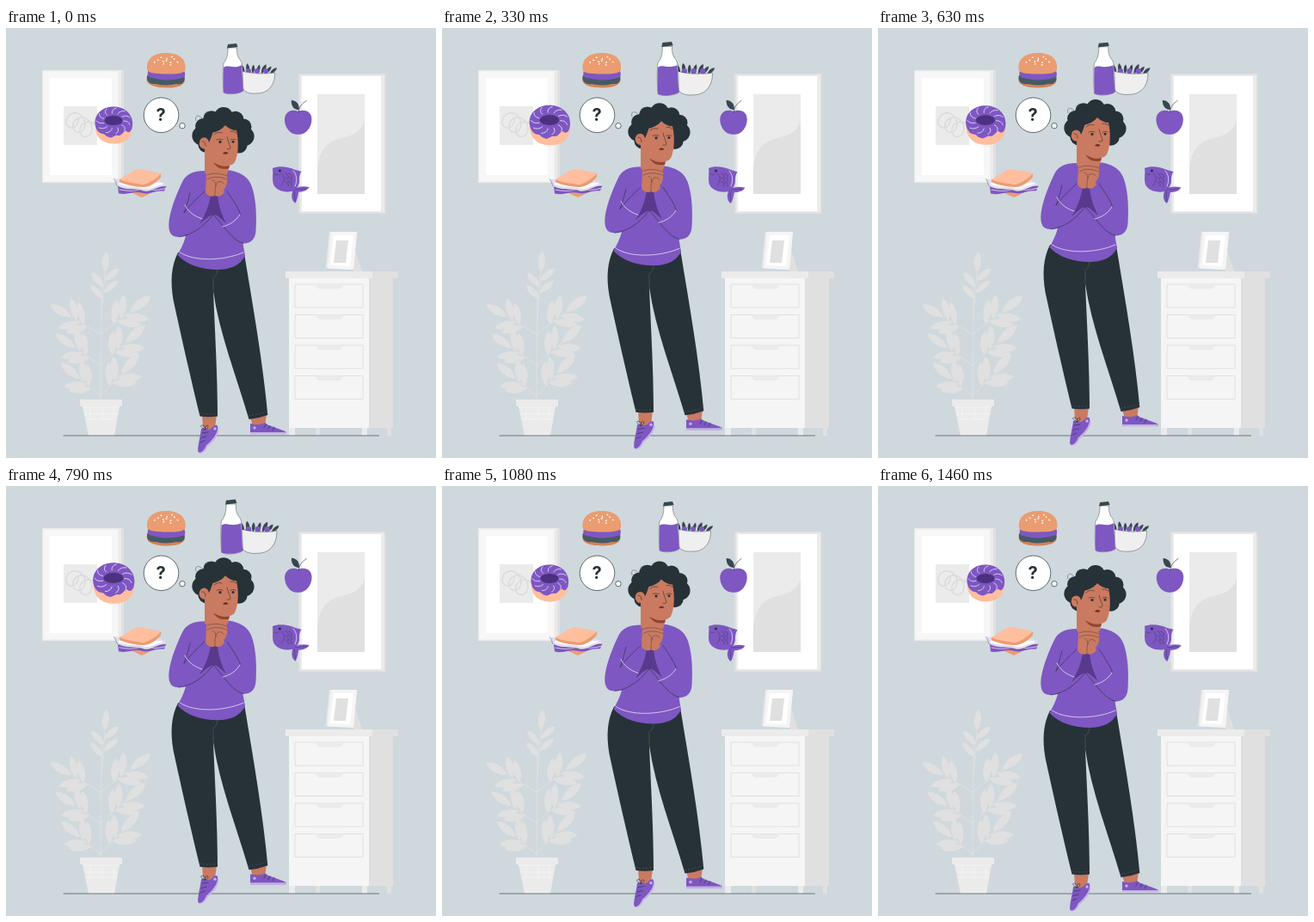
Write an HTML page that moves like this. It is 500x500 px and loops after 1.5 s.

```html
<!DOCTYPE html>
<html lang="en">
<head>
<meta charset="utf-8">
<title>What to eat</title>
<style>
html,body{margin:0;width:100%;height:100%;overflow:hidden;background:#cfd8dd}
svg{display:block;width:100vw;height:100vh}
.p{fill:#7e57c2}.d{fill:#263238}.s{fill:#ca7a60}.w{fill:#fff}
.a{fill:#f5f5f5}.b{fill:#ebebeb}.c{fill:#e0e0e0}.o{fill:#eb9c70}
.l{fill:none;stroke:#263238;stroke-width:.6;stroke-linecap:round;stroke-linejoin:round}
.t{stroke-width:.4}
.h{fill:none;stroke:#e9e0f7;stroke-width:.8;stroke-linecap:round}
.g{fill:none;stroke:#e0e0e0;stroke-width:1}
.k{fill:none;stroke:#52616a;stroke-width:.6}
</style>
</head>
<body>
<svg viewBox="0 0 500 500">
<!-- wall pictures -->
<g>
  <path class="c" d="M131 49h6v131h-6z"/>
  <path class="b" d="M42 49h92v131H42z"/>
  <path fill="#f7f7f7" d="M43.500 50.500h87v128h-87z"/>
  <path class="w" d="M51 58h72v113H51z"/>
  <path class="b" d="M67 91h39v45H67z"/>
  <path fill="none" stroke="#dcdcdc" stroke-width="1.600" id="scribble"/>
  <path class="c" d="M340 53h101.500v163H340z"/>
  <path class="b" d="M342 54.500h98v160h-98z"/>
  <path class="w" d="M344 56h92v157h-92z"/>
  <path class="b" d="M362 77h55v116h-55z"/>
  <path class="c" d="M362 172C362 150 368 136 383 130C395 126 411 126 417 108V193H362Z"/>
</g>
<!-- drawers -->
<g>
  <path class="c" d="M422 291h28v174h-28zM426 283h30v8h-30zM360 465h5v9h-5zM443 465h5v9h-5z"/>
  <path class="b" d="M325 283h101v8H325zM329 465h7v9h-7zM414 465h6v9h-6z"/>
  <path class="a" d="M329 291h93v174h-93z"/>
  <g id="drawers"></g>
  <path class="c" d="M404 252L414 283H404Z"/>
  <path class="b" d="M376 237H408L404 281L372 279Z"/>
  <path class="a" d="M378 237H408L404 281L374 279.500Z"/>
  <path class="w" d="M381 241H404L400 277L377 276Z"/>
  <path class="c" d="M384 247H398L395 273H381Z"/>
</g>
<!-- plant -->
<g id="plant" class="c"></g>
<path class="b" d="M86 432h49v8H86zM89 440h43L126 474H96Z"/>
<path fill="none" stroke="#f5f5f5" stroke-width=".8" d="M89 441H132M91 449H130M93 455H129M98 441V455M112 441V455M125 441V455"/>
<path class="l" d="M67 474H433.500"/>

<!-- thought bubble -->
<circle class="w" cx="180.500" cy="101.300" r="20.300" stroke="#263238" stroke-width=".7"/>
<circle class="w" cx="205" cy="113.700" r="3.200" stroke="#263238" stroke-width=".7"/>
<text x="180" y="108.400" text-anchor="middle" font-family="Inter,'Open Sans',sans-serif" font-weight="700" font-size="20" class="d">?</text>

<g id="burger">
  <path fill="#d18458" d="M164 57H207C210 65 202 69.500 186 69.500S161 65 164 57Z"/>
  <path fill="#455a64" d="M164 55C162 63 168 66 174 65Q186 68 198 65C205 66 209 62 207 55Z"/>
  <path class="p" d="M165 50H207C209 54 208 58 204 58Q186 63 169 58C164 58 164 54 165 50Z"/>
  <path class="o" d="M163.500 47C163 36 171 29 186 29S209 36 208.300 47C208 52 203 53.500 186 53.500S164 52 163.500 47Z"/>
  <g id="seeds" class="w"></g>
</g>

<g id="donut">
  <path fill="#ffbe9d" d="M104 112C103 127 112 134.500 126 134.500S148 126 147 112Z"/>
  <path class="p" d="M103.500 111C103 99 113 91.500 125 91.500S147 99 147.200 111C147 120 143 123 140 120C137 118 135 126 130 125C126 124 124 129 120 127C115 126 116 123 112 123C107 122 104 117 103.500 111Z"/>
  <ellipse cx="125" cy="107.500" rx="10.500" ry="5.500" fill="#4c3180"/>
  <path class="h" id="icing"/>
</g>

<g id="sandwich">
  <path class="o" d="M138 188L158 184L179 187L158 197Z"/>
  <path class="p" d="M130 184H186L184 189.500C174 188 167 194 159 192C148 189 142 195 131 192.500Z"/>
  <path class="h" d="M132 188Q146 191 157 187.500Q172 190 185 186.500"/>
  <path fill="#e3daf4" d="M125 175.500L136 176L176 177L184.500 179.500L186 184C177 183 170 191 161 190C150 186 143 190 131 185C127 183 129 179 125 175.500Z"/>
  <path class="w" d="M131 182C145 187 151 183 161 187C170 188 174 182 182 182V180H131Z"/>
  <path class="o" d="M132 176L160 182L180 169V173C175 180 166 185 160 185C149 185 137 182 132 179Z"/>
  <path fill="#ffbe9d" d="M132 176C138 173 148 165 153 164C160 165 174 167 179 169C181 171 166 181 160 182C150 181 136 179 132 176Z"/>
  <path class="l t" d="M125 175.500C129 179 127 183 131 185C143 190 150 186 161 190C170 191 177 183 186 184"/>
</g>

<g id="drinks">
  <g id="salad"></g>
  <path fill="#efefef" stroke="#263238" stroke-width=".4" d="M274 50C285 53 299 54 312.500 52C313 66 305 76 292 76C282 77 276 74 274 68Z"/>
  <path class="w" stroke="#263238" stroke-width=".4" d="M258 23H268.500C268 30 270 35 273 38C276 43 275 62 276 73C272 77 257 78 253 75C252 64 252 45 253 41C257 36 258 31 258 23Z"/>
  <path class="p" d="M253 46C258 42 263 48 274 43.500C275 55 275 64 276 73C271 77 258 77.500 253 75C252.500 64 252.500 53 253 46Z"/>
  <path fill="#37474f" d="M258 19L268 18L269.500 22L257 23.500Z"/>
</g>

<g id="apple">
  <path class="p" d="M339 97C331 93.500 323.500 98 323.500 107C324 117 331 124.500 339 123.700C348 124.500 355 116 355 106C355 97 347 93.500 339 97Z"/>
  <path fill="#37474f" d="M340 95C334 95 331 91 331 84C337 84 341 89 340 95Z"/>
  <path class="l" d="M339.500 98C340 92 343 88 348.500 84.500"/>
</g>

<g id="fish">
  <path class="p" d="M310 163C317 160 328 161 336 165L343.500 167C341 171 341 174 341 179C340 184 338 187 336 187C341 184 347 184 352.500 185.500C350 190 344 191 340 191C339 196 338 201 336 204C332 201 331 196 333 190C325 192 314 189 311 182C309 176 311 169 310 163Z"/>
  <path class="l t" d="M312 170Q315 172 317 170M320 169Q327 175 320 183M336 188L349 187M335 190L336 201"/>
  <path class="l t" id="scales"/>
  <circle class="d" cx="318.500" cy="166" r="1.500"/>
  <path class="h" d="M334 166C338 170 339 177 336 184"/>
</g>

<g id="person">
  <!-- feet -->
  <path class="s" d="M228 450H245L243 465C238 468 232 467 229 464ZM284 453L303 449L301 463H287Z"/>
  <path fill="#c5b1e6" d="M246 462C250 470 244 479 234 487C232 493 227 496 224 494Z"/>
  <path class="p" d="M227 466C231 464 234 468 238 466C240 465 242 461 245.500 462C248 467 243 477 233 485C230 492 226 495 223.500 493C222 488 226 476 227 466Z"/>
  <path class="p" d="M284 460C289 461 296 462 301 459C307 464 318 465 326 470L325 472H284Z"/>
  <path fill="#c5b1e6" d="M284 470H325C327 471 326 472.300 324 472.300H284Z"/>
  <circle cx="289" cy="465" r="1.700" fill="#c5b1e6"/>
  <circle cx="243" cy="466" r="1.700" fill="#c5b1e6"/>
  <path class="l" d="M231 467C226 464 225 462 229 462C232 463 232 466 231 467C231 463 234 461 235 463C235 466 232 467 231 467"/>
  <path class="l" id="laces"/>
  <!-- trousers -->
  <path class="d" d="M200 261C192 277 191 294 194.500 316C204 360 215 408 225.500 451.500Q236 453 246 451.500C246 405 243 355 241 306C248 355 268 405 282.500 455Q294 454 304.300 450C299 391 288 329 277 262Z"/>
  <path class="k" d="M246 281Q245 289 240 291M241 292V306"/>
  <path class="k" stroke-dasharray="2 2" d="M225 448Q235 450 246 448M282 451Q293 450 303 446"/>
  <!-- neck and sweater -->
  <path class="p" d="M232 166C217 166 209 170 204.500 180C197 196 190 214 189.300 228C189 239 193 243 201 243L209 242C207 250 203 257 199.500 264C211 276 228 281 246 281C261 281 272 276 278 265L275.500 250.500C284 251 290 246 290.500 236C291.500 220 291 202 287 188C284 176 277 169 261 165.500Z"/>
  <path fill="#58398c" d="M238 194H246C247 205 250 216 256 227C250 222 246 217 241 217C236 218 231 223 225 228C232 217 236 207 238 194Z"/>
  <path class="l" d="M214 192C211 203 210 208 207 215M231 190C222 198 213 207 207 215M257 190C263 199 269 207 273 217M241 217C230 231 217 241 201 243M241 217C252 228 262 247 276 250.500"/>
  <path class="h" d="M208 206C212 214 219 219 228 222M252 231C260 229 267 225 272 217M202.500 261C218 272 254 271 276 261"/>
  <path class="s" d="M231 140L262 150L258 168C249 177 237 175 231 168Z"/>
  <path fill="#8f4630" d="M241 156C247 160 254 162 260 160L259 163.500C251 165 245 163 241 156Z"/>
  <!-- head -->
  <g id="hair" class="d"></g>
  <path class="l t" d="M228 105C222 99 219 104 221 108M240 99C234 95 230 99 231 102"/>
  <path class="s" d="M238 122C245 121 251 118 255 113C259 117 264 119 268 119C270.500 130 271 146 266 156C262 162 251 161 243 157L231 151V138Z"/>
  <ellipse class="s" cx="230.500" cy="134" rx="5.800" ry="6.600"/>
  <path class="d" d="M232 117H242C240 122 239 127 236 133C235 129 233 127 231 126Z"/>
  <path class="l" d="M228 132Q232 131 232 137M245 130Q248 128.500 252 130M261 130Q264 128.500 267 130M257 127C258 132 261 137 261 140Q259 142 257 141"/>
  <path class="l" stroke-width="1.200" d="M242 124Q246 120 251 122M261 120Q265 119 268 122"/>
  <circle class="d" cx="249" cy="132.500" r="1.600"/>
  <circle class="d" cx="264" cy="132.300" r="1.500"/>
  <path fill="#71301f" d="M252 146C254 143.500 257 143.500 258.500 146Q255 147.500 252 146Z"/>
  <!-- hands -->
  <path class="s" d="M233 170C239 165 249 165 257 170C258 178 257 184 253 188L254 191C251 195 247 197 243 195C239 197 234 195 232 191Z"/>
  <path class="l t" d="M234 171C241 168 249 169 257 172M234 176C241 172 249 173 257 176M243 195C243 187 243 184 246 179C249 178 252 179 253 181M240 177Q244 178 244 184"/>
</g>
</svg>
<script>
const $ = id => document.getElementById(id);
const LOOP = 1500, TAU = Math.PI * 2;
const {sin, cos, atan2} = Math;

const times = (n, make) => Array.from({length: n}, (_, i) => make(i));
const fill = (id, parts) => { $(id).innerHTML = parts.join(''); };
const path = (id, parts) => $(id).setAttribute('d', parts.join(''));

// Almond leaf of length n at angle a
const leaf = (x, y, a, n, shade = '') =>
  `<path ${shade} transform="translate(${x} ${y}) rotate(${a * 360 / TAU}) scale(${n / 10})" d="M0 0C3 -2.2 7.500 -2.200 10 0C7.500 2.200 3 2.200 0 0Z"/>`;

// Twig with leaves on both sides and one at the tip
function twig(x, y, u, v, pairs, size) {
  const a = atan2(v - y, u - x);
  const at = k => [x + (u - x) * k, y + (v - y) * k];
  const leaves = times(pairs * 2, i =>
    leaf(...at(.45 + .5 * i / (pairs * 2)), a + (i % 2 ? .8 : -.8), size));
  return `<path class="g" d="M${x} ${y}L${u} ${v}"/>` + leaves.join('') + leaf(u, v, a, size * 1.1);
}

fill('plant', [
  twig(110, 434, 111, 300, 0, 0),
  twig(111, 340, 115, 284, 2, 22),
  ...times(3, i => {
    const y = 356 + 36 * i, reach = 34 - 5 * i;
    return twig(110, y, 110 - reach, y - 20, 2, 26) + twig(110, y, 110 + reach, y - 26, 2, 28);
  })
]);

fill('drawers', times(4, i => {
  const y = 298 + 35.5 * i;
  return `<rect class="g" x="336" y="${y}" width="79" height="27"/>
    <path class="b" d="M360 ${y}H392Q391 ${y + 5.5} 386 ${y + 5.5}H366Q361 ${y + 5.5} 360 ${y}Z"/>`;
}));

// Looping scribble
path('scribble', times(70, i => {
  const a = i * .27;
  return `${i ? 'L' : 'M'}${75 + i * .34 + 9 * cos(a)} ${105 + i * .22 + 10 * sin(a)}`;
}));

// Curls run round the head from the left ear to the right cheek
fill('hair', ['<ellipse cx="252" cy="120" rx="26" ry="18"/>', ...times(9, i => {
  const a = TAU * (.385 + .092 * i);
  return `<circle cx="${252.5 + 25.5 * cos(a)}" cy="${122.5 + 19.5 * sin(a)}" r="${10 + sin(i * 2)}"/>`;
})]);

fill('seeds', times(12, i => {
  const a = i * 2.4, r = Math.sqrt(i / 12);
  return `<ellipse rx="1.2" ry=".7" transform="translate(${186 + 17 * r * cos(a)} ${38 + 5.5 * r * sin(a)}) rotate(${i * 50})"/>`;
}));

// Curved streaks from the hole to the rim
path('icing', times(11, i => {
  const a = TAU * i / 11;
  const at = (r, b) => `${125 + 21 * r * cos(b)} ${108 + 16 * r * sin(b)}`;
  return `M${at(.55, a)}Q${at(.85, a)} ${at(.95, a + .3)}`;
}));

fill('salad', times(7, i => {
  const x = 277 + i * 5;
  return leaf(x, 53, -1.9 + i * .2, 11 + sin(i * 2), 'fill="#37474f"') +
    (i % 2 ? `<circle class="p" cx="${x}" cy="50" r="3"/>` : '');
}));

path('scales', times(6, i => `M${325 + i % 2 * 4} ${169 + (i >> 1) * 5}q4 1 3 5`));
path('laces', times(3, i =>
  `M${228 - i} ${471 + i * 5.5}L${235 - i * 2} ${470 + i * 5}M${300 + i * 5} ${465 + i * 1.5}l2 -4`));

const move = (id, value) => $(id).setAttribute('transform', value);
const zoom = (id, x, y, s) => move(id, `translate(${x} ${y}) scale(${s}) translate(${-x} ${-y})`);

function draw(t) {
  const rise = 4.6 * (1 - cos(TAU * (t + 50) / LOOP));
  move('person', `translate(0 ${-rise})`);

  // two swells, then a rest
  const swell = t < 1000 ? (1 - cos(TAU * t / 500)) / 2 : 0;
  zoom('donut', 125.5, 113, 1 + .11 * swell);
  zoom('drinks', 283, 48, 1 + .085 * swell);

  const sway = cos(TAU * (t / 750 - .12));
  move('burger', `translate(${.4 * sway} 0) rotate(${.6 * sway} 186 50)`);
  move('apple', `translate(${.5 * sway} 0) rotate(${sway} 340 112)`);
  move('fish', `rotate(${-sway} 322 172)`);
  move('sandwich', `rotate(${.6 * sway} 156 182)`);
}

function tick(now) {
  draw(now % LOOP);
  requestAnimationFrame(tick);
}
draw(0);
requestAnimationFrame(tick);
</script>
</body>
</html>
```
